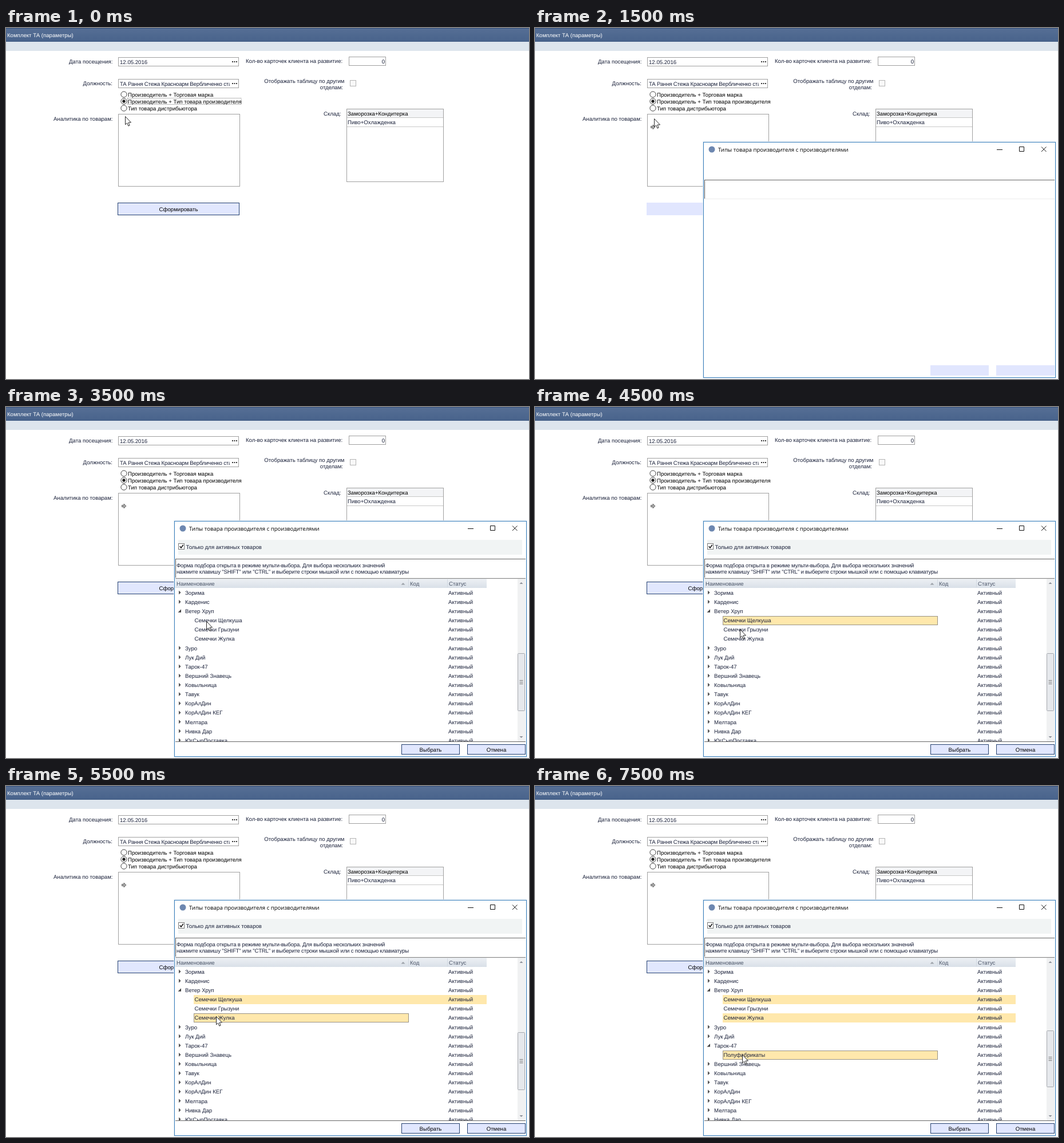
Write an HTML page that moves like this. It is 914x613 px and loops after 8 s.

```html
<!DOCTYPE html>
<html lang="ru">
<head>
<meta charset="utf-8">
<style>
html, body { margin: 0; width: 100%; height: 100%; overflow: hidden; background: #fff; }
svg { display: block; width: 914px; height: 613px; }
text { font: 9.65px "Liberation Sans", Arial, sans-serif; fill: #1a213a; text-rendering: geometricPrecision; white-space: pre; }
text.caption { font: 9.6px "Open Sans", "Noto Sans", sans-serif; fill: #000; }
text.hint { letter-spacing: -.2px; }
</style>
</head>
<body>
<svg id="stage" viewBox="0 0 914 613">
  <defs>
    <linearGradient id="bar" x2="0" y2="1">
      <stop stop-color="#566f95"/><stop offset="1" stop-color="#48638b"/>
    </linearGradient>
    <linearGradient id="head" x2="0" y2="1">
      <stop stop-color="#edf0f4"/><stop offset="1" stop-color="#d9e0e8"/>
    </linearGradient>
    <clipPath id="jobClip"><path d="M198 90H391V104H198Z"/></clipPath>
    <clipPath id="listClip"><path d="M296 300H894V584H296Z"/></clipPath>
  </defs>
  <g id="form"></g>
  <g id="dialog"></g>
  <path id="cursor" d="M0 0V14.2L3.2 11.4 5.3 16.6 7.6 15.6 5.5 10.5H10Z" fill="#fff" stroke="#111" stroke-width=".9"/>
</svg>
<script>
const STEP = 500, STEPS = 16, ROW = 16.13;
const $ = id => document.getElementById(id);

const makers = ["Зорима", "Карденис", "Ветер Хруп", "Зуро", "Лук Дий", "Тарок-47", "Вершний Знавець",
  "Ковыльница", "Тавук", "КорАлДин", "КорАлДин КЕГ", "Мелтара", "Нивка Дар", "ЮгСырПоставка",
  "Прибрежная Рыбная Контора", "Югпитснаб Союз", "Пасечка"];
const children = {
  "Ветер Хруп": ["Семечки Щелкуша", "Семечки Грызуни", "Семечки Жулка"],
  "Тарок-47": ["Полуфабрикаты"]
};

// Cursor tip: first step at which it holds, x, y
const path = [[0, 208, 154], [1, 208, 158], [5, 320, 481], [6, 303, 354], [7, 350, 374],
  [9, 358, 388], [10, 367, 402], [12, 320, 438], [13, 303, 451], [15, 362, 469]];

const text = (x, y, s, attrs = "") => `<text x="${x}" y="${y}" ${attrs}>${s}</text>`;
const right = (x, y, s) => text(x, y, s, 'text-anchor="end"');
const rect = (x, y, w, h, fill, stroke = "none", attrs = "") =>
  `<rect x="${x}" y="${y}" width="${w}" height="${h}" fill="${fill}" stroke="${stroke}" ${attrs}/>`;
const line = (d, color, attrs = "") => `<path d="${d}" fill="none" stroke="${color}" ${attrs}/>`;
const shape = (d, fill) => `<path d="${d}" fill="${fill}"/>`;

function button(x, y, w, h, label, ready) {
  return ready
    ? rect(x + .5, y + .5, w, h, "#e1e7fe", "#24406f") +
      text(x + w / 2 + .5, y + h / 2 + 4.2, label, 'text-anchor="middle" style="fill:#000"')
    : rect(x, y, w + 1, h + 1, "#e1e6fe");
}

function field(x, y, w, dots) {
  const marks = [396, 399.5, 403].map(d => rect(d - 1, y + 6.5, 1.9, 1.9, "#222")).join("");
  return rect(x, y, w, 15, "#fff", "#a0a0a0") + (dots ? marks : "");
}

function radio(y, label, on) {
  return `<circle cx="206" cy="${y}" r="5.1" fill="#fff" stroke="#333" stroke-width=".9"/>` +
    (on ? `<circle cx="206" cy="${y}" r="2.7" fill="#222"/>` : "") +
    text(213, y + 4, label, 'style="fill:#000"');
}

function drawForm(step) {
  return rect(0, 0, 914, 24, "url(#bar)") + rect(0, 0, 914, 1, "#34507c") + rect(0, 23, 914, 1, "#3f5a83") +
    rect(0, 24, 914, 16, "#dde5ed") +
    text(2, 16, "Комплект ТА (параметры)", 'style="fill:#fff"') +
    right(186.5, 62, "Дата посещения:") + field(196.5, 51.5, 210, true) + text(199, 63, "12.05.2016") +
    text(419, 61, "Кол-во карточек клиента на развитие:") + field(599.5, 50.5, 64) + right(662, 62, "0") +
    right(186, 100, "Должность:") + field(196.5, 89.5, 210, true) +
    text(199, 101, "ТА Рання Стежа Красноарм Вербличенко стажер", 'class="hint" clip-path="url(#jobClip)"') +
    right(591.5, 96, "Отображать таблицу по другим") + right(589, 107, "отделам:") +
    rect(601.5, 91.5, 10, 10, "#f8f8f8", "#b4b4b4") +
    radio(116, "Производитель + Торговая марка") +
    radio(128, "Производитель + Тип товара производителя", true) +
    radio(140, "Тип товара дистрибьютора") +
    (step < 1 ? rect(212.5, 122.5, 198.5, 11, "none", "#555", 'stroke-dasharray="1 1" stroke-width=".8"') : "") +
    right(186.5, 162, "Аналитика по товарам:") + rect(196.5, 150.5, 212, 126, "#fff", "#a0a0a0") +
    (step > 0 ? `<path d="M202.5 171.5H206V169L210 173 206 177V174.5H202.5Z" fill="#aaa" stroke="#555" stroke-width=".8"/>` : "") +
    right(585.5, 153, "Склад:") + rect(595.5, 141.5, 169, 127, "#fff", "#a0a0a0") +
    rect(596, 142, 168, 14.5, "#f3f4f6") + line("M596 156.5H764M596 172.5H764", "#c8c8c8") +
    text(597, 153, "Заморозка+Кондитерка", 'style="fill:#000"') + text(597, 168, "Пиво+Охлажденка") +
    button(195, 305, 212, 21, "Сформировать", step !== 3);
}

function listRows(step) {
  const open = { "Ветер Хруп": step > 6, "Тарок-47": step > 13 };
  const picks = { "Семечки Щелкуша": 8, "Семечки Жулка": 11, "Полуфабрикаты": 15 };
  const focus = Object.keys(picks).filter(name => step >= picks[name]).pop();
  const rows = makers.flatMap(name =>
    [[name, 0], ...(open[name] ? children[name].map(child => [child, 1]) : [])]);

  return rows.slice(0, 17).map(([name, level], i) => {
    const mid = 324 + i * ROW, top = Math.round(mid - 7.5);
    let out = "";
    if (step >= picks[name]) out += name === focus
      ? rect(328.5, top + .5, 375, 15, "#ffe8ac") +
        rect(328.5, top + .5, 375, 15, "none", "#333", 'stroke-dasharray="1 1"')
      : rect(328, top, 512, 16, "#ffe8ac");
    if (!level) out += open[name]
      ? shape(`M306 ${mid - 3}V${mid + 2.5}H300.5Z`, "#444")
      : shape(`M302 ${mid - 3.5}L305.6 ${mid} 302 ${mid + 3.5}Z`, "#555");
    return out + text(level ? 329.5 : 313, mid + 3.8, name) + text(773, mid + 3.8, "Активный");
  }).join("");
}

function scrollbar(step) {
  const [top, bottom] = step < 7 ? [439, 549] : step < 14 ? [430, 531] : [427, 526];
  const mid = Math.round((top + bottom) / 2) - .5;
  return rect(894, 300, 14, 284, "#f0f1f2") +
    shape("M897.5 309L900.5 306 903.5 309Z", "#8a8f98") + shape("M897.5 575L900.5 578 903.5 575Z", "#8a8f98") +
    rect(894.5, top + .5, 12, bottom - top - 1, "#e6e8ec", "#a4a8ae", 'rx="1"') +
    line([-3, 0, 3].map(d => `M897.5 ${mid + d}H903.5`).join(""), "#777");
}

function drawDialog(step) {
  if (step < 3) return "";
  const ready = step > 3;
  let out = rect(293.5, 198.5, 617, 413, "none", "#e4ecf3") +
    rect(294.5, 199.5, 615, 411, "#fff", "#3a80bd") +
    `<circle cx="309" cy="212" r="5.5" fill="#6d87b0"/>` +
    text(320, 216, "Типы товара производителя с производителями", 'class="caption"') +
    line("M807 212.5H817M846.5 207.5H854.5V215.5H846.5ZM885 207.5L893.5 216M893.5 207.5L885 216", "#111") +
    line("M296 265.5H908", "#666") + line("M296.5 265V298", "#555") + line("M297 298.5H908", "#ececec");
  if (ready) out += rect(301, 232, 601, 26, "#f1f4f4") +
    rect(301.5, 238.5, 10, 10, "#fff", "#777") +
    line("M303.7 243.3L306 246 309.7 240.7", "#111", 'stroke-width="1.5"') +
    text(314.5, 247.8, "Только для активных товаров") +
    text(298, 280, "Форма подбора открыта в режиме мульти-выбора. Для выбора нескольких значений", 'class="hint"') +
    text(298, 291, 'нажмите клавишу "SHIFT" или "CTRL" и выберите строки мышкой или с помощью клавиатуры', 'class="hint"') +
    line("M296 299.5H908", "#888") + rect(296, 300, 544, 16, "url(#head)") +
    line("M703.5 301V315M771.5 301V315", "#d2d9e2") +
    [[298, "Наименование"], [706, "Код"], [774, "Статус"]]
      .map(([x, s]) => text(x, 312.3, s, 'style="fill:#4b5568"')).join("") +
    shape("M690.5 310.5L694 307 697.5 310.5Z", "#9ca1a8") +
    `<g clip-path="url(#listClip)">${listRows(step)}</g>` + scrollbar(step) +
    line("M296 584.5H908", "#666");
  return out + button(691, 589, 101, 17, "Выбрать", ready) + button(806, 589, 101, 17, "Отмена", ready);
}

let shown = -1;
function tick(now) {
  const step = Math.floor(now / STEP) % STEPS;
  if (step !== shown) {
    shown = step;
    $("form").innerHTML = drawForm(step);
    $("dialog").innerHTML = drawDialog(step);
    const [, x, y] = path.filter(p => p[0] <= step).pop();
    $("cursor").setAttribute("transform", `translate(${x + .5} ${y + .5})`);
  }
  requestAnimationFrame(tick);
}
tick(performance.now());
</script>
</body>
</html>
```
